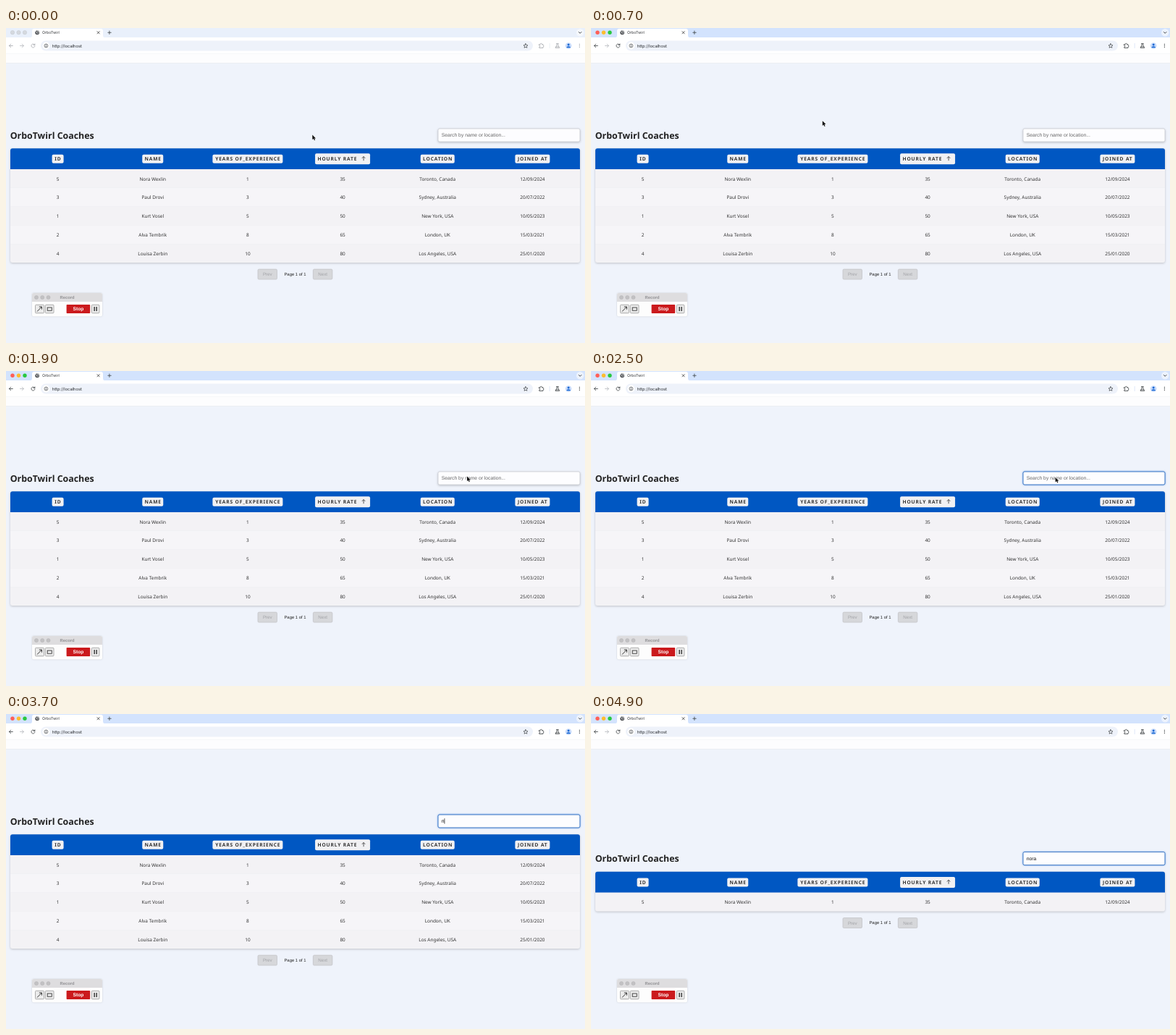
An HTML page that plays this animation: 800 px wide and 435 px high, repeating every 5000 ms.

```html
<!DOCTYPE html>
<html lang="en">
<head>
<meta charset="utf-8">
<title>OrboTwirl</title>
<style>
  html, body { margin: 0; width: 100%; height: 100%; overflow: hidden; background: #eff3fb; }
  svg { display: block; width: 800px; height: 435px; }
  text { font-family: "Noto Sans", sans-serif; text-rendering: geometricPrecision; white-space: pre; }
  .ui { font-family: Inter, sans-serif; }
  .arial { font-family: "Liberation Sans", Arial, sans-serif; }
  .mid { text-anchor: middle; }
  .line { fill: none; stroke-linecap: round; stroke-linejoin: round; }
  .shadow { filter: drop-shadow(0 1px 1.5px rgba(0, 0, 0, .2)); }
</style>
</head>
<body>
<svg viewBox="0 0 800 435">
  <g id="browser"></g>
  <g id="page"></g>
  <g id="recorder"></g>
  <path id="cursor" d="M0 0V6.6L1.6 5.2L2.7 7.6L3.8 7.1L2.8 4.8H4.8Z" fill="#111" stroke="#fff" stroke-width=".6" paint-order="stroke"/>
</svg>
<script>
const LOOP = 5000, STEP = 100;
const FOCUS_WINDOW = 700, FOCUS_FIELD = 2400, HIDE_CURSOR = 3600;
const KEYS = [[3600, 'n'], [3800, 'no'], [4000, 'nor'], [4200, 'nora']];
// time, x, y of the pointer tip
const PATH = [[0, 423.3, 147.6], [600, 319.8, 128.3], [1000, 319.8, 128.3], [1600, 635, 145],
  [1700, 635, 145], [1900, 637, 145.6], [2500, 641.6, 146.9]];

const COLUMNS = ['ID', 'NAME', 'YEARS OF_EXPERIENCE', 'HOURLY RATE', 'LOCATION', 'JOINED AT'];
const LABEL_WIDTHS = [16, 29, 97, 76, 47, 48];
const COACHES = [
  [5, 'Nora Wexlin', 1, 35, 'Toronto, Canada', '12/09/2024'],
  [3, 'Paul Drovi', 3, 40, 'Sydney, Australia', '20/07/2022'],
  [1, 'Kurt Vosel', 5, 50, 'New York, USA', '10/05/2023'],
  [2, 'Alva Tembrik', 8, 65, 'London, UK', '15/03/2021'],
  [4, 'Louisa Zerbin', 10, 80, 'Los Angeles, USA', '25/01/2020'],
];
const ROW = 25.8, HEAD_BOTTOM = 195, LEFT = 6, WIDTH = 787;

const $ = id => document.getElementById(id);
const rect = (x, y, w, h, fill, more = '') =>
  `<rect x="${x}" y="${y}" width="${w}" height="${h}" fill="${fill}" ${more}/>`;
const circle = (x, y, r, fill, more = '') =>
  `<circle cx="${x}" cy="${y}" r="${r}" fill="${fill}" ${more}/>`;
const line = (d, color, width = .8) =>
  `<path class="line" d="${d}" stroke="${color}" stroke-width="${width}"/>`;
const text = (x, y, size, fill, str, cls = '', more = '') =>
  `<text x="${x}" y="${y}" font-size="${size}" fill="${fill}" class="${cls}" ${more}>${str}</text>`;
const BOLD = 'font-weight="700"';

function browser(active) {
  const ink = active ? '#3c4043' : '#a5a8ad';
  const lights = active ? ['#ff5f57', '#febc2e', '#28c840'] : Array(3).fill('#d5d9df');
  const edge = active ? '' : 'stroke="#c3c8cf" stroke-width=".5"';
  const strip = active ? '#d3e3fd' : '#e9f0fb';
  return rect(0, 0, 800, 13, strip) +
    rect(0, 13, 800, 35.5, '#fff') + rect(0, 35, 800, 13.5, '#fdfdfe') +
    rect(0, 35, 800, .5, '#eef0f3') + rect(0, 48.3, 800, .6, '#e3e6ec') +
    lights.map((c, i) => circle(9 + i * 8.5, 6.2, 2.7, c, edge)).join('') +
    '<path d="M33 13.2Q36 13.2 36 10V4Q36 1 39 1H131Q134 1 134 4V10Q134 13.2 137 13.2Z" fill="#fff"/>' +
    circle(43.2, 6.3, 2.9, '#45484c') +
    line('M41.3 5.2L43 5.8L42.6 7.4M43.7 3.9L44 5.2L45.4 5.5M44 7.6L45 7.1', '#fff', .7) +
    text(50, 8.3, 5.2, '#2b2d30', 'OrboTwirl', 'ui') +
    line('M126 4.7L129.2 7.9M129.2 4.7L126 7.9', '#333') +
    line('M140.8 6.3H145.2M142.9 4.1V8.5', '#3c4043') +
    circle(793.2, 6.3, 5.2, active ? '#edf3fe' : '#f5f8fd') + line('M791.4 5.5L793.2 7.3L795 5.5', '#333', .9) +
    line('M9.3 24.5H4.5M6.7 22.2L4.4 24.5L6.7 26.8', ink) +
    line('M19.5 24.5H24.3M22.1 22.2L24.4 24.5L22.1 26.8', '#b6b9be') +
    line('M39.7 23.4A2.5 2.5 0 1 0 39.9 25.2M39.9 21.9V23.6H38.1', ink) +
    rect(48, 17.5, 680, 14, '#eef2fa', 'rx="7"') + circle(55.4, 24.5, 5, '#fff') +
    circle(55.4, 24.5, 2.4, 'none', 'stroke="#3c4043" stroke-width=".7"') +
    line('M55.4 24.3V25.7M55.4 23.2V23.2', '#3c4043', .7) +
    text(63.8, 26.6, 5.75, '#25282c', 'http://localhost', 'ui') +
    line('M718 21.6L718.9 23.6L721 23.8L719.4 25.2L719.9 27.3L718 26.2L716.1 27.3L716.6 25.2L715 23.8L717.1 23.6Z', '#3c4043', .7) +
    line('M736.8 22.6H738.4Q738.4 21.3 739.4 21.3T740.4 22.6H742V24Q743 24 743 25T742 26V27.5H736.8V26Q738.1 26 738.1 25T736.8 24Z', ink, .8) +
    rect(750.8, 21, .6, 7, active ? '#c9d8f3' : '#dfe5ee') +
    line('M760.6 21.6H763.2M761 21.8V24L759 27.4H764.8L762.8 24V21.8M760 25.8H763.8', ink, .8) +
    circle(777.2, 24.5, 4.3, '#c9dcfb') + circle(777.2, 23.1, 1.5, '#1967d2') +
    '<path d="M774.3 27.2Q774.5 25.2 777.2 25.2T780.1 27.2Z" fill="#1967d2"/>' +
    [22.4, 24.5, 26.6].map(y => circle(792.4, y, .65, ink)).join('');
}

function field(y, query, focused, caretOn) {
  const border = focused
    ? 'stroke="#3f78c4" stroke-width="1" style="filter:drop-shadow(0 0 1px #6ba0e8)"'
    : 'stroke="#c9ccd2" stroke-width=".8" class="shadow"';
  return rect(597, y - 9, 196, 18, '#fdfdff', `rx="2" ${border}`) +
    text(601.8, y + 2.2, 6.77, query ? '#111' : '#666', query || 'Search by name or location...', 'arial', 'id="query"') +
    (caretOn ? rect(601.7, y - 3.8, .7, 7.4, '#111', 'id="caret"') : '');
}

function header(y) {
  return COLUMNS.map((label, i) => {
    const x = LEFT + WIDTH / 6 * (i + .5), w = LABEL_WIDTHS[i], sorted = i === 3;
    const h = sorted ? 15 : 12;
    return rect(x - w / 2, y - h / 2, w, h, '#f1f1f3', 'rx="2"') +
      text(sorted ? x - 7.2 : x + .4, y + 2.5, 6.7, '#333', label, 'mid', `${BOLD} letter-spacing=".83"`) +
      (sorted ? line(`M${x + 29} ${y + 2}V${y - 3}M${x + 27} ${y - 1.2}L${x + 29} ${y - 3.2}L${x + 31} ${y - 1.2}`, '#333', .8) : '');
  }).join('');
}

const button = (x, y, label) =>
  rect(x, y - 7, 26.5, 14, '#d6d7da', 'rx="1.5" stroke="#c0c1c5" stroke-width=".7"') +
  text(x + 13.25, y + 2.2, 6.2, '#a2a3a7', label, 'arial mid');

function page(query, focused, caretOn) {
  const rows = COACHES.filter(c => (c[1] + '\n' + c[4]).toLowerCase().includes(query));
  const shift = (COACHES.length - rows.length) * ROW / 2;
  const top = 166.2 + shift, body = HEAD_BOTTOM + shift, bottom = body + rows.length * ROW;
  const cells = rows.map((row, r) => {
    const y = body + r * ROW;
    return (r % 2 ? rect(LEFT, y, WIDTH, ROW, '#f6f5f8') : '') +
      (r ? rect(LEFT, y - .25, WIDTH, .5, '#ececf0') : '') +
      row.map((v, i) => text(LEFT + WIDTH / 6 * (i + .5), y + 15.5, 6.45, '#333', v, 'mid')).join('');
  }).join('');
  return text(5.7, 152.8 + shift, 12.4, '#222', 'OrboTwirl Coaches', '', BOLD) +
    field(148 + shift, query, focused, caretOn) +
    rect(LEFT, top, WIDTH, bottom - top, '#f3f2f5', 'rx="3" class="shadow"') +
    `<path d="M${LEFT} ${body}V${top + 3}q0-3 3-3H${LEFT + WIDTH - 3}q3 0 3 3V${body}Z" fill="#0057c2"/>` +
    header(top + 14.6) + cells +
    button(348, bottom + 16.1, 'Prev') +
    text(399.5, bottom + 17.9, 5.9, '#222', 'Page 1 of 1', 'arial mid') +
    button(424.4, bottom + 16.1, 'Next');
}

function recorder() {
  const key = (x, w) => rect(x, 382.3, w, 11.4, '#ececec', 'rx="1" stroke="#9a9a9a" stroke-width=".8"');
  return rect(36, 366, 97, 32.3, '#fdfdfd', 'rx="2.5" style="filter:drop-shadow(0 0 1px rgba(0,0,0,.15))"') +
    '<path d="M36 378V368.5q0-2.5 2.5-2.5H130.500q2.500 0 2.500 2.500V378Z" fill="#dedddf"/>' +
    [42, 50.2, 58.5].map(x => circle(x, 372, 2.6, '#c2c1c3', 'stroke="#b2b1b3" stroke-width=".4"')).join('') +
    text(84.5, 374.2, 5.8, '#929194', 'Record', 'arial mid', BOLD) +
    key(40.5, 12) + line('M43.3 391.2L49.2 385.2M46.2 385H49.4V388.2', '#222', .9) +
    key(54.4, 11.6) + rect(57.2, 386, 6, 4.2, 'none', 'stroke="#222" stroke-width=".8"') +
    rect(83.6, 382, 32.6, 12, '#cb1a1d', 'rx=".8"') +
    text(99.9, 390.3, 6.7, '#fff', 'Stop', 'arial mid', BOLD) +
    key(118.4, 10.5) + rect(121.5, 385, 1.3, 6, '#222') + rect(124.5, 385, 1.3, 6, '#222');
}

function pointerAt(t) {
  const i = PATH.findIndex(p => p[0] > t);
  if (i < 0) return PATH.at(-1).slice(1);
  const [a, b] = [PATH[i - 1], PATH[i]];
  const u = (t - a[0]) / (b[0] - a[0]), e = u * u * (3 - 2 * u);
  return [1, 2].map(k => a[k] + (b[k] - a[k]) * e);
}

function draw(t) {
  const typed = KEYS.findLast(k => k[0] <= t);
  const focused = t >= FOCUS_FIELD;
  // the caret restarts its blink with every key
  const caretOn = typed ? t - typed[0] < 500 : t >= 3000 && t < 3500;
  $('browser').innerHTML = browser(t >= FOCUS_WINDOW);
  $('page').innerHTML = page(typed ? typed[1] : '', focused, caretOn);
  if (typed && caretOn) $('caret').setAttribute('x', 601.8 + $('query').getComputedTextLength());
  $('cursor').setAttribute('transform', `translate(${pointerAt(t)})`);
  $('cursor').style.display = t < HIDE_CURSOR ? '' : 'none';
}

$('recorder').innerHTML = recorder();
let shown = -1;
const start = performance.now();
function tick() {
  const t = Math.floor((performance.now() - start) % LOOP / STEP) * STEP;
  if (t !== shown) draw(shown = t);
  requestAnimationFrame(tick);
}
tick();
</script>
</body>
</html>
```
